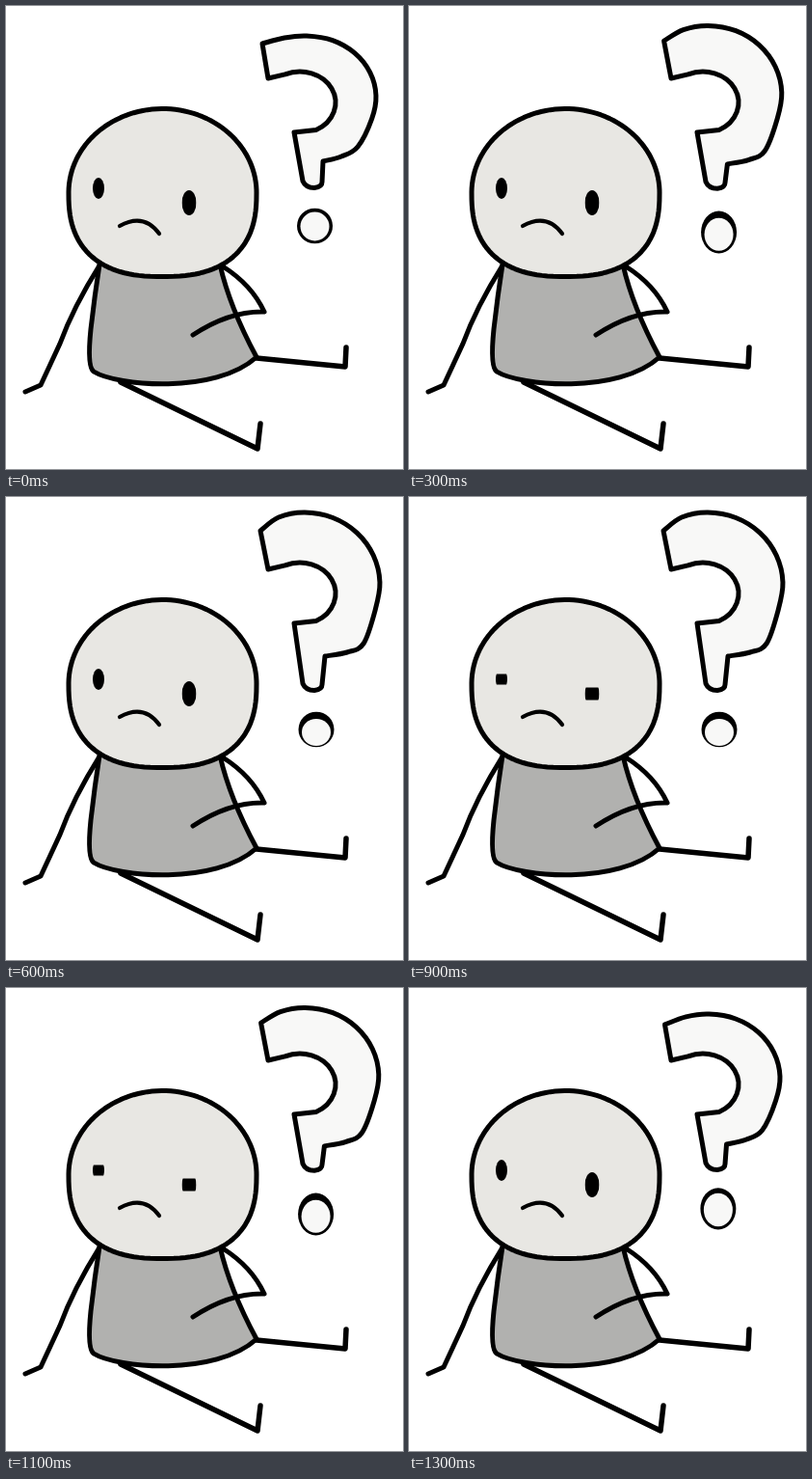
Animation of 412 by 480 pixels, one loop 1400 ms. Source, as an HTML page with a canvas:

```html
<!DOCTYPE html>
<html lang="en">
<head>
<meta charset="utf-8">
<title>Puzzled figure</title>
<style>
html, body { margin: 0; width: 100%; height: 100%; overflow: hidden; background: #fff }
canvas { display: block }
</style>
</head>
<body>
<canvas id="stage" width="412" height="480"></canvas>
<script>
const ctx = document.getElementById('stage').getContext('2d');
ctx.lineCap = ctx.lineJoin = 'round';
const { sin, cos, abs, sign, min, PI } = Math;

function ink(path, width, fill) {
  if (fill) {
    ctx.fillStyle = fill;
    ctx.fill(path);
  }
  ctx.lineWidth = width;
  ctx.stroke(path);
}

function oval(x, y, rx, ry, fill) {
  ctx.beginPath();
  ctx.ellipse(x, y, rx, ry, 0, 0, 2 * PI);
  ctx.fillStyle = fill;
  ctx.fill();
}

// An ellipse whose lower half is a little squarer
function headPath() {
  const path = new Path2D();
  for (let a = 0; a < 2 * PI; a += 0.05) {
    const power = sin(a) > 0 ? 0.8 : 1;
    const round = v => sign(v) * abs(v) ** power;
    path.lineTo(162.5 + 97.5 * round(cos(a)), 193.5 + 87 * round(sin(a)));
  }
  path.closePath();
  return path;
}

const head = headPath();
const body = new Path2D('M97 268Q92 300 88 335Q84 374 91 379C115 394 217 403 260 364Q232 312 222 268');
const arms = new Path2D('M97 269Q70 312 56 350L36 393 20 400M225 270Q255 289 268 317Q232 316 194 341');
const legs = new Path2D('M260 365L352 374 353 354M119 390L261 459 264 433');
const mouth = new Path2D('M118 228Q143 214 159 236');

function drawEye(x, y, rx, ry, open) {
  if (!open) return ink(new Path2D(`M${x - 14} ${y}h28`), 4.5);
  // The lids hide the top and bottom of the oval
  ctx.save();
  ctx.beginPath();
  ctx.rect(x - rx, y - ry * open, 2 * rx, 2 * ry * open);
  ctx.clip();
  oval(x, y, rx, ry, '#000');
  ctx.restore();
}

function drawFigure(open) {
  ink(body, 5, '#b1b1af');
  ink(arms, 5);
  ink(legs, 5.5);
  ink(head, 5, '#e8e7e3');
  ink(mouth, 4.2);
  drawEye(96, 189, 6, 11, open);
  drawEye(190, 204, 7.5, 13, open);
}

// Smooth curve through the points, continuing the path
function curve(path, points) {
  const at = i => points[Math.max(0, min(points.length - 1, i))];
  path.lineTo(...points[0]);
  for (let i = 1; i < points.length; i++) {
    const [a, b, c, d] = [at(i - 2), at(i - 1), at(i), at(i + 1)];
    path.bezierCurveTo(b[0] + (c[0] - a[0]) / 6, b[1] + (c[1] - a[1]) / 6,
      c[0] - (d[0] - b[0]) / 6, c[1] - (d[1] - b[1]) / 6, ...c);
  }
}

// u: 0 is the relaxed question mark, 1 the fully stretched one
function drawMark(u) {
  const outer = [[266 - 2 * u, 39 - 4 * u], [289 - 6 * u, 33 - 12 * u]];
  for (let deg = -90; deg <= 20; deg += 22) {
    const a = deg * PI / 180;
    outer.push([312 - 2 * u + (72 + 6 * u) * cos(a), 95 - 4 * u + (64 + 11 * u) * sin(a)]);
  }
  outer.push([365 + 6 * u, 146 + 6 * u], [348 + 6 * u, 156 + 5 * u], [329 + 2 * u, 161 + 4 * u]);

  const tip = 187.5 + 12 * u ** 8;
  const mark = new Path2D();
  curve(mark, outer);
  mark.lineTo(328, tip - 5);
  mark.quadraticCurveTo(328, tip, 320, tip + 1);
  mark.quadraticCurveTo(311, tip + 1, 308, tip - 6);
  mark.lineTo(299, 131);
  mark.ellipse(305, 100, 37, 32, 0, 1.1, -2, true);
  mark.lineTo(272, 75);
  mark.closePath();
  ink(mark, 5, '#f8f8f7');

  const x = 320.5 + 1.5 * u, y = 228 + 13 * u * u, swell = sin(PI * u);
  oval(x, y, 18.5, 18.3 + 4.5 * swell, '#000');
  oval(x, y + 0.5 + 2.5 * u, 15, 15 + 3.5 * swell - u, '#f8f8f7');
}

const begin = performance.now();
function draw() {
  const step = Math.floor((performance.now() - begin) % 1400 / 100);
  const stretch = step < 10 ? min(step, 6) : 14 - step;
  ctx.fillStyle = '#fff';
  ctx.fillRect(0, 0, 412, 480);
  drawFigure(min(1, abs(step - 10) / 2));
  drawMark(sin(stretch / 6 * PI / 2));
  requestAnimationFrame(draw);
}
draw();
</script>
</body>
</html>
```
